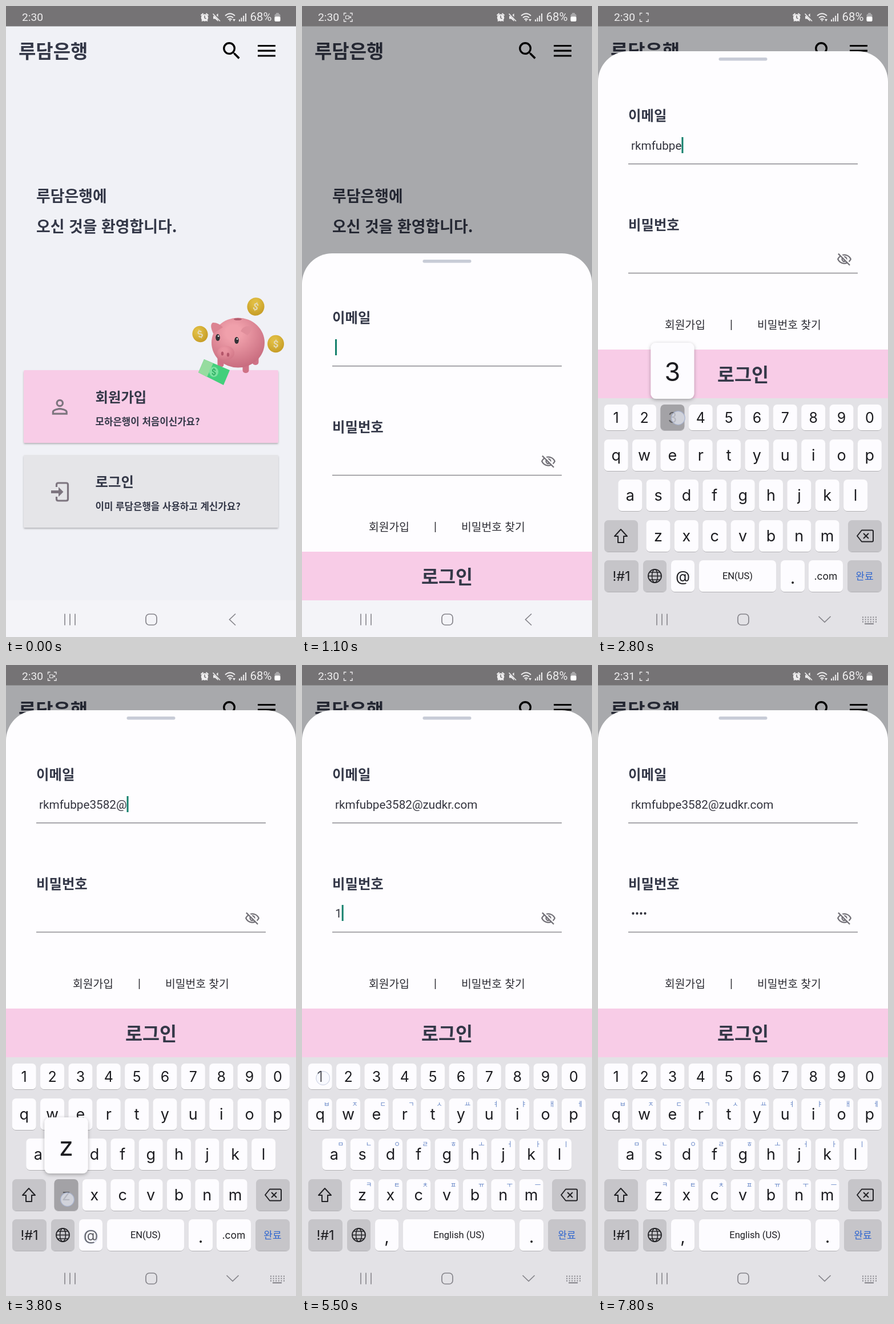
An HTML page for the animation above (8 s loop, 508x1102 px).

```html
<!DOCTYPE html>
<html lang="ko">
<head>
<meta charset="utf-8">
<style>
html, body { margin: 0; width: 100%; height: 100%; overflow: hidden; background: #f0f1f6; }
svg { display: block; }
text { font-family: Roboto, "Noto Sans CJK KR", "Noto Sans CJK", "Noto Sans CJK JP", sans-serif; white-space: pre; }
.ko { font-family: "Noto Sans CJK KR", "Noto Sans CJK", "Noto Sans CJK JP", sans-serif; }
.cap { font-family: Inter, Roboto, sans-serif; }
</style>
</head>
<body>
<script>
const LOOP = 8000, LIFT = 353;
const INK = '#343848', PINK = '#f8cce7', ICON = '#7d757f';

function el(parent, tag, attrs = {}) {
  const node = document.createElementNS('http://www.w3.org/2000/svg', tag);
  set(node, attrs);
  if (parent) parent.appendChild(node);
  return node;
}
function set(node, attrs) {
  for (const k in attrs) node.setAttribute(k, attrs[k]);
}
const group = (p, attrs) => el(p, 'g', attrs);
const box = (p, x, y, width, height, fill, rx = 0, more = {}) =>
  el(p, 'rect', { x, y, width, height, fill, rx, ...more });
const disc = (p, cx, cy, r, fill, more = {}) => el(p, 'circle', { cx, cy, r, fill, ...more });
const oval = (p, cx, cy, rx, ry, fill, more = {}) => el(p, 'ellipse', { cx, cy, rx, ry, fill, ...more });
const shape = (p, d, fill, more = {}) => el(p, 'path', { d, fill, ...more });
const line = (p, d, stroke, width, more = {}) =>
  el(p, 'path', { d, fill: 'none', stroke, 'stroke-width': width, ...more });
function label(p, x, y, str, size, fill = INK, more = {}) {
  const node = el(p, 'text', { x, y, 'font-size': size, fill, ...more });
  node.textContent = str;
  return node;
}
const MID = { 'text-anchor': 'middle' };
const KO = { class: 'ko' };
const BOLD = { class: 'ko', 'font-weight': 700 };
const show = (node, on) => node.setAttribute('visibility', on ? 'inherit' : 'hidden');
const ramp = (t, a, b) => Math.min(1, Math.max(0, (t - a) / (b - a)));
const easeOut = u => 1 - (1 - u) ** 3;

const svg = el(document.body, 'svg', { viewBox: '0 0 508 1102', width: 508, height: 1102 });
const defs = el(svg, 'defs');
function gradient(id, from, to) {
  const g = el(defs, 'radialGradient', { id, cx: .42, cy: .3, r: .75 });
  el(g, 'stop', { offset: .2, 'stop-color': from });
  el(g, 'stop', { offset: 1, 'stop-color': to });
}
gradient('pig', '#f0a0ab', '#c5687b');
gradient('snout', '#e994a1', '#d07586');
gradient('gold', '#e0bd42', '#c49a24');
function shadow(id, dy, blur, opacity) {
  const f = el(defs, 'filter', { id, x: '-20%', y: '-20%', width: '140%', height: '150%' });
  el(f, 'feDropShadow', { dx: 0, dy, stdDeviation: blur, 'flood-opacity': opacity });
}
shadow('card', 2, 1.5, .25);
shadow('cap', 1, .6, .22);
shadow('lift', 2, 3, .3);

// Home screen
const home = group(svg);
box(home, 0, 35, 508, 1003, '#f0f1f6');
label(home, 22, 90.5, '루담은행', 33, INK, BOLD);
shape(home, 'M15.5 14h-.79l-.28-.27A6.47 6.47 0 0 0 16 9.5 6.5 6.5 0 1 0 9.5 16c1.61 0 3.09-.59 4.23-1.57l.27.28v.79l5 4.99L20.49 19zm-6 0a4.5 4.5 0 1 1 0-9 4.5 4.5 0 0 1 0 9z',
  '#050505', { transform: 'translate(375 58) scale(1.69)' });
line(home, 'M441 69.5h31M441 78.2h31M441 87h31', '#050505', 3.2);
label(home, 53, 342, '루담은행에', 26.9, INK, BOLD);
label(home, 53, 394.5, '오신 것을 환영합니다.', 26.9, INK, BOLD);

function card(y, fill, title, note) {
  const g = group(home);
  box(g, 31, y, 446, 127, fill, 2, { filter: 'url(#card)' });
  label(g, 156.5, y + 56, title, 24.4, INK, BOLD);
  label(g, 156.5, y + 95.5, note, 16.8, INK, { ...KO, 'font-weight': 600 });
  return g;
}
const joinCard = card(636, PINK, '회원가입', '모하은행이 처음이신가요?');
shape(joinCard, 'M12 5.9a2.1 2.1 0 1 1 0 4.2 2.1 2.1 0 0 1 0-4.2m0 9c2.97 0 6.1 1.46 6.1 2.1v1.1H5.9V17c0-.64 3.13-2.1 6.1-2.1M12 4a4 4 0 1 0 0 8 4 4 0 0 0 0-8zm0 9c-2.67 0-8 1.34-8 4v3h16v-3c0-2.66-5.33-4-8-4z',
  ICON, { transform: 'translate(74 680) scale(1.69)' });
const loginCard = card(784, '#e5e5e8', '로그인', '이미 루담은행을 사용하고 계신가요?');
line(loginCard, 'M88.5 840v-4q0-3 3-3h14q3 0 3 3v25q0 3-3 3h-14q-3 0-3-3v-4', ICON, 3.2);
shape(loginCard, 'M79 846h13v-6l8.5 8.5-8.5 8.5v-6h-13z', ICON);

// Piggy bank
const pig = group(home);
const coins = [[437.5, 525, 15, 15], [340, 573, 13.5, -20], [472.5, 590, 14.5, 0]];
for (const [x, y, r, tilt] of coins) {
  const g = group(pig, { transform: `translate(${x} ${y}) rotate(${tilt})` });
  oval(g, 0, 0, r, r + .8, 'url(#gold)');
  label(g, 0, 6, '$', 17, '#e4d8b4', { ...MID, 'font-weight': 700 });
}
for (const [x, y] of [[376, 622], [420, 632], [437, 618]]) box(pig, x - 5.5, y - 12, 11, 21, '#cf7286', 5);
oval(pig, 406.5, 588, 46.5, 43.5, 'url(#pig)');
oval(pig, 406, 547, 7, 2, '#b55f70');
shape(pig, 'M363 572q-7-15-1-19 9-1 18 8z', '#dc8492');
shape(pig, 'M411 568q5-11 18-8 3 7-6 15z', '#e08e9b');
oval(pig, 371, 579, 3.8, 6, '#343236');
oval(pig, 404, 584, 3.8, 6, '#343236');
disc(pig, 372, 576.5, 1.3, '#fff');
disc(pig, 405, 581.5, 1.3, '#fff');
oval(pig, 385, 606, 15, 12.5, 'url(#snout)');
oval(pig, 379, 607, 2.2, 3.5, '#b4566a');
oval(pig, 389, 609, 2.2, 3.5, '#b4566a');
shape(pig, 'M347 617l45 19-11 26-44-22z', '#43cf7c');
shape(pig, 'M347 617l16 7-11 24-15-8z', '#96dc9f');
oval(pig, 364, 639, 8, 9, '#7be2a0');
label(pig, 364, 644, '$', 14, '#2fae63', { ...MID, 'font-weight': 700 });

const dim = box(svg, 0, 35, 508, 1067, '#000');

// Login sheet
const sheet = group(svg);
shape(sheet, 'M0 1102V485A53 53 0 0 1 53 432H455A53 53 0 0 1 508 485V1102z', '#fefdff');
box(sheet, 211.5, 443, 85, 5.5, '#c8ccd7', 2.7);
label(sheet, 53, 553, '이메일', 24.4, INK, BOLD);
label(sheet, 53, 744, '비밀번호', 24.4, INK, BOLD);
line(sheet, 'M53 628.7h402M53 819.5h402', '#8b8a90', 1.5);
shape(sheet, 'M12 6a9.77 9.77 0 0 1 8.82 5.5 9.65 9.65 0 0 1-2.41 3.12l1.41 1.41c1.39-1.23 2.49-2.77 3.18-4.53C21.27 7.11 17 4 12 4c-1.27 0-2.49.2-3.64.57l1.65 1.65C10.66 6.09 11.32 6 12 6zm-1.07 1.14L13 9.21c.57.25 1.03.71 1.28 1.28l2.07 2.07c.08-.34.14-.7.14-1.07C16.5 9.01 14.48 7 12 7c-.37 0-.72.05-1.07.14zM2.01 3.87l2.68 2.68A11.7 11.7 0 0 0 1 11.5C2.73 15.89 7 19 12 19c1.52 0 2.98-.29 4.32-.82l3.42 3.42 1.41-1.41L3.42 2.45zm7.5 7.5l2.61 2.61-.12.02a2.5 2.5 0 0 1-2.5-2.5zm-3.4-3.4l1.75 1.75a4.6 4.6 0 0 0-.36 1.78 4.5 4.5 0 0 0 6.27 4.14l.98.98c-.88.24-1.8.38-2.75.38a9.77 9.77 0 0 1-8.82-5.5c.7-1.43 1.72-2.61 2.93-3.53z',
  '#727077', { transform: 'translate(417.8 782) scale(1.14)' });
label(sheet, 117, 916.5, '회원가입', 19.3, '#2c2c33', KO);
label(sheet, 279, 916.5, '비밀번호 찾기', 19.3, '#2c2c33', KO);
line(sheet, 'M233.5 901v18', '#2c2c33', 1.5);
box(sheet, 0, 953, 508, 149, '#f2f1f5');
const button = group(sheet);
box(button, 0, 953, 508, 85, PINK);
label(button, 254, 1008.5, '로그인', 32.7, INK, { ...BOLD, ...MID });
const email = label(sheet, 58, 604, '', 20.7, '#33343e');
const secret = label(sheet, 58, 794, '', 20.7, '#33343e');
const caret = box(sheet, 58, 582, 3, 28, '#14806c');

// Keyboard
const board = group(svg);
box(board, 0, 685, 508, 417, '#e3e2e6');
const symLayer = group(board), textLayer = group(board);
const keys = {};
function key(p, id, x, y, w, h, size, opts = {}) {
  const fill = opts.fill || '#fdfcff';
  const cap = box(p, x, y, w, h, fill, 7, { filter: 'url(#cap)' });
  const cx = x + w / 2, cy = y + h / 2;
  const text = label(p, cx, cy + (opts.drop ?? size * .36), opts.text ?? id, size,
    opts.ink || '#1c1c20', { class: 'cap', ...MID, ...opts.attrs });
  keys[id] = { cap, text, fill, cx, cy, top: y, wide: w > 50 };
}
const rows = [
  ['1234567890', 696, 45, 31.7, ''],
  ['qwertyuiop', 757, 55, 31.7, 'ㅂㅈㄷㄱㅅㅛㅕㅑㅐㅔ'],
  ['asdfghjkl', 827, 55, 56.3, 'ㅁㄴㅇㄹㅎㅗㅓㅏㅣ'],
  ['zxcvbnm', 898, 55, 105.5, 'ㅋㅌㅊㅍㅠㅜㅡ'],
];
const hints = group(svg);
for (const [chars, y, h, first, marks] of rows) {
  [...chars].forEach((ch, i) => {
    const cx = first + 49.35 * i;
    key(board, ch, cx - 21, y, 42, h, marks ? 27 : 25);
    if (marks) label(hints, cx + 11.5, y + 14, marks[i], 11.5, '#5f80c4', { ...KO, ...MID });
  });
}
board.append(hints);
const GRAY = { fill: '#c6c5c9' };
const BLANK = { ...GRAY, text: '' };
const DONE = { ...GRAY, text: '완료', ink: '#2f66cf', attrs: KO };
const SPACE = { attrs: { class: '' } };
key(board, 'shift', 11, 898, 59, 55, 20, BLANK);
key(board, 'back', 438, 898, 59, 55, 20, BLANK);
key(board, '!#1', 11, 968, 60, 55, 23.5, GRAY);
key(board, 'globe', 79, 968, 41, 55, 20, BLANK);
key(symLayer, '@', 128, 968, 41, 55, 26, { drop: 9 });
key(symLayer, 'EN(US)', 177, 968, 135, 55, 16.5, SPACE);
key(symLayer, '.', 320, 968, 42, 55, 30, { drop: 13 });
key(symLayer, '.com', 369, 968, 60, 55, 17.5);
key(symLayer, 'done', 437, 968, 60, 55, 17, DONE);
key(textLayer, ',', 128, 968, 41, 55, 30, { drop: 13 });
key(textLayer, 'English (US)', 177, 968, 196, 55, 16.5, SPACE);
key(textLayer, 'stop', 381, 968, 42, 55, 30, { drop: 13, text: '.' });
key(textLayer, 'done2', 431, 968, 66, 55, 17, DONE);
const ROUND = { 'stroke-linejoin': 'round' };
line(board, 'M40 914l11 12h-6v11h-10v-11h-6z', '#222226', 2, ROUND);
line(board, 'M454 925.5l8-10h18q2 0 2 2v16q0 2-2 2h-18zM465 921l9 9M474 921l-9 9', '#222226', 2, ROUND);
line(board, 'M88 995.5h23M90 989h19M90 1002h19', '#222226', 1.5);
disc(board, 99.5, 995.5, 11.5, 'none', { stroke: '#222226', 'stroke-width': 1.8 });
oval(board, 99.5, 995.5, 5, 11.5, 'none', { stroke: '#222226', 'stroke-width': 1.5 });

// Navigation bar
const nav = group(svg);
const navBack = box(nav, 0, 1038, 508, 64, '#f4f4f8');
const NAV = '#85848a';
line(nav, 'M103 1061.5v20M112 1061.5v20M121 1061.5v20', NAV, 1.6);
box(nav, 245, 1062, 19, 19, 'none', 6, { stroke: NAV, 'stroke-width': 1.7 });
const backArrow = line(nav, 'M402 1061.5l-10.5 10 10.5 10', NAV, 1.7);
const downArrow = group(nav);
line(downArrow, 'M386.5 1066l10.5 10 10.5-10', NAV, 1.7);
line(downArrow, 'M463 1067.5h25M463 1071.5h25M463 1075.5h25', NAV, 2, { 'stroke-dasharray': '2 2.6' });
line(downArrow, 'M467 1079h16', NAV, 2);

// Key preview and touch dots
const popup = group(svg);
const popBox = box(popup, 0, 0, 76, 98, '#fdfcff', 9, { filter: 'url(#lift)' });
const popText = label(popup, 0, 0, '', 45, '#1c1c20', { class: 'cap', ...MID });
const dots = [0, 1, 2].map(() =>
  disc(svg, 0, 0, 11.8, '#f0f4ff', { 'fill-opacity': .6, stroke: '#a9b4cf', 'stroke-width': 1.3 }));

// Status bar
const bar = group(svg);
const W = '#eeedee', BAR = '#757375';
box(bar, 0, 0, 508, 35.5, BAR);
const clock = label(bar, 28, 26, '2:30', 19.2, W);
const rec = group(bar);
line(rec, 'M73.5 16.5v-4h4M84 12.5h4v4M88 23v4h-4M77.5 27h-4v-4', W, 1.3);
const cam = group(rec);
box(cam, 76.5, 17, 6, 5.5, 'none', 1, { stroke: W, 'stroke-width': 1.2 });
shape(cam, 'M83 19.5l3-2v4.5z', W);
disc(bar, 348, 20.5, 6.2, W);
line(bar, 'M341.5 16.5l4-3.5M354.5 16.5l-4-3.5M343 26.5l2-2M353 26.5l-2-2', W, 2);
line(bar, 'M348 16.8v4l2.5 1.4', BAR, 1.5);
shape(bar, 'M363 17.5h3.5l5-4.5v14l-5-4.5h-3.5z', W);
line(bar, 'M363 12.5l12.5 13.5', BAR, 3.5);
line(bar, 'M362.5 13.5l12.5 13', W, 1.6);
line(bar, 'M384 17q8.5-7.5 17 0M387 20.5q5.5-4.5 11 0M389.5 23.5q3-2 6 0', W, 1.8);
shape(bar, 'M390.5 24.5h4l-2 2.5zM397 23h5l-2.5 4z', W);
line(bar, 'M409 27v-3.5M412.500 27v-6.5M416.2 27v-10M420 27v-14', W, 2);
label(bar, 427.5, 26, '68%', 20.4, W);
box(bar, 470.5, 14, 10, 13, '#a8a7a9', 2.5);
box(bar, 473, 12, 5, 3, '#a8a7a9', 1);
box(bar, 470.5, 18.5, 10, 8.5, '#fff', 2);

// [key, press time, touch offset x, y]
const HOLD = 100;
const typed = [
  ['r', 1550, 0, 8], ['k', 1700, 3, 6], ['m', 1840, -4, 9], ['f', 1980, 2, 10],
  ['u', 2120, -3, 8], ['b', 2260, 4, 6], ['p', 2400, -5, 9], ['e', 2540, 3, 12],
  ['3', 2770, 10, 1], ['5', 2980, 4, 6], ['8', 3180, -3, 8], ['2', 3390, 5, 4],
  ['@', 3630, 0, 3], ['z', 3800, 2, 8], ['u', 3940, -4, 10], ['d', 4080, 3, 9],
  ['k', 4200, 0, 8], ['r', 4330, -6, 25], ['.com', 4450, 6, 17],
];
const pin = [['1', 5330, 5, 3], ['2', 5520, 3, 6], ['3', 5710, 2, 4], ['4', 5900, -4, 5]];
const presses = [...typed, ...pin];
// [x, y, down, up]
const taps = [[250, 850, 150, 300], [210, 600, 1180, 1270], [200, 434, 4750, 4850], [127.5, 652, 6110, 6330]];
const touches = [
  ...taps,
  ...presses.map(([id, at, dx, dy]) => [keys[id].cx + dx, keys[id].cy + dy, at, at + HOLD]),
];
const done = (list, t) => list.filter(p => p[1] + HOLD <= t);

function drawPopup(t) {
  for (const id in keys) {
    keys[id].cap.setAttribute('fill', keys[id].fill);
    keys[id].text.setAttribute('opacity', 1);
  }
  const hit = presses.find(p => t >= p[1] && t < p[1] + HOLD);
  show(popup, hit);
  if (!hit) return;
  const k = keys[hit[0]], w = k.wide ? 114 : 76;
  const x = Math.min(500 - w, Math.max(8, k.cx - w / 2));
  k.cap.setAttribute('fill', '#a3a2a6');
  k.text.setAttribute('opacity', k.wide ? .9 : .5);
  set(popBox, { x, y: k.top - 108, width: w });
  set(popText, { x: x + w / 2, y: k.top - 57 + (k.wide ? 8 : 16), 'font-size': k.wide ? 24.4 : 45 });
  popText.textContent = hit[0];
}

function drawTouches(t) {
  const live = touches.filter(p => t >= p[2] && t < p[3] + 150);
  dots.forEach((dot, i) => {
    show(dot, live[i]);
    if (!live[i]) return;
    const [cx, cy, , end] = live[i];
    set(dot, { cx, cy, opacity: 1 - ramp(t, end, end + 150) });
  });
}

function drawFields(t) {
  const mail = done(typed, t), code = done(pin, t);
  email.textContent = mail.map(p => p[0]).join('');
  const last = code[code.length - 1];
  const plain = last && t < last[1] + HOLD + 1500;
  secret.textContent = '•'.repeat(code.length - (plain ? 1 : 0)) + (plain ? last[0] : '');

  const onPin = t >= 4850;
  const since = Math.max(onPin ? 4850 : 1000, ...[...mail, ...code].map(p => p[1] + HOLD));
  show(caret, t >= 1000 && (t - since) % 1000 < 500);
  const field = onPin ? secret : email;
  set(caret, { x: 58 + (field.textContent ? field.getComputedTextLength() : 0), y: onPin ? 772 : 582 });
}

function render(t) {
  const open = easeOut(ramp(t, 380, 800));
  const up = easeOut(ramp(t, 1260, 1520));
  dim.setAttribute('opacity', .3 * open);
  show(sheet, open > 0);
  sheet.setAttribute('transform', `translate(0 ${620 * (1 - open) - LIFT * up})`);
  show(board, up > 0);
  board.setAttribute('transform', `translate(0 ${LIFT * (1 - up)})`);
  navBack.setAttribute('fill', up > 0 ? '#e3e2e6' : '#f4f4f8');
  show(backArrow, up === 0);
  show(downArrow, up > 0);

  const cardDown = ramp(t, 150, 220) - ramp(t, 300, 450);
  loginCard.setAttribute('opacity', 1 - .7 * cardDown);
  const buttonDown = ramp(t, 6110, 6190) - ramp(t, 6330, 6580);
  button.setAttribute('opacity', 1 - .8 * buttonDown);

  const full = t >= 4950;
  show(symLayer, !full);
  show(textLayer, full);
  show(hints, full);

  clock.textContent = t < 7500 ? '2:30' : '2:31';
  show(rec, t >= 300);
  const beat = t % 2400;
  show(cam, t >= 300 && (t < 800 || beat >= 800 && beat < 2000));

  drawFields(t);
  drawPopup(t);
  drawTouches(t);
}

function tick() {
  render(performance.now() % LOOP);
  requestAnimationFrame(tick);
}
tick();
</script>
</body>
</html>
```
